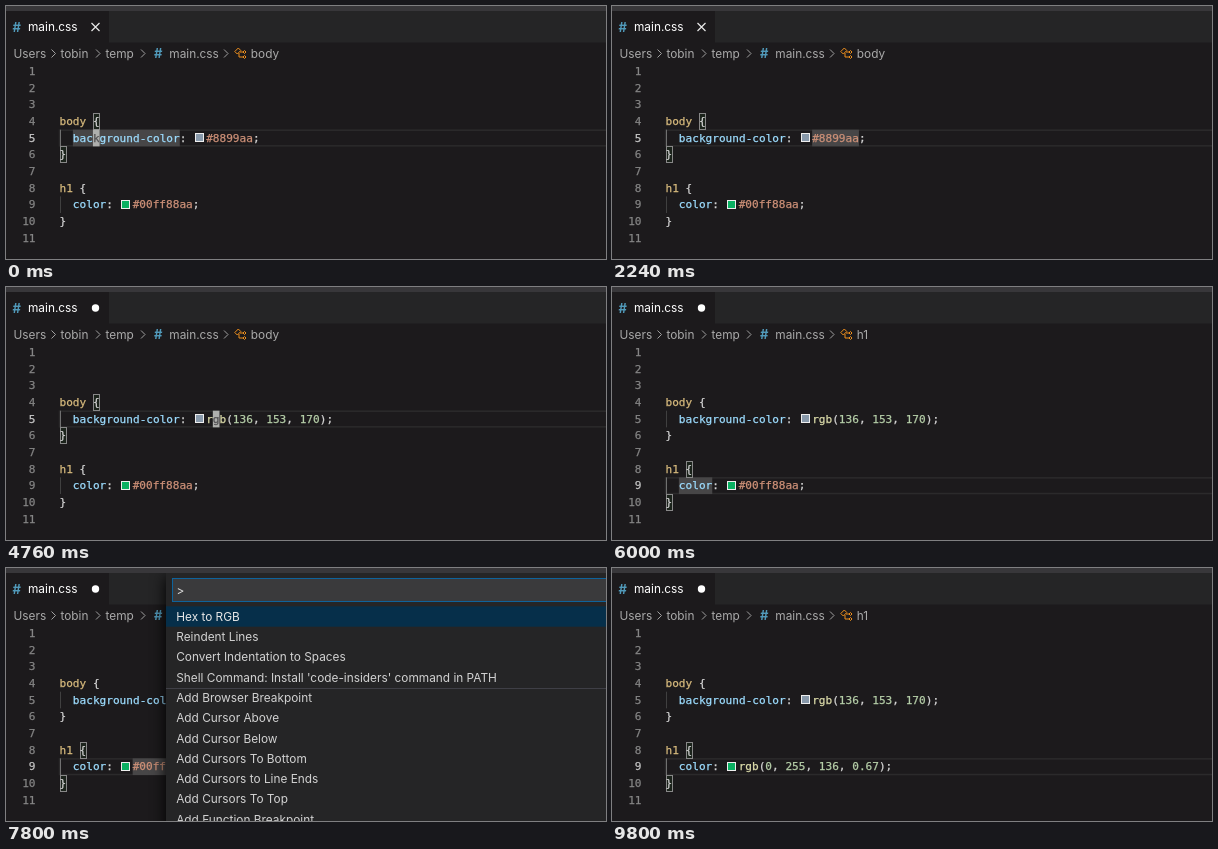
Animation, 600 px wide and 253 px high, one loop 9.84 s. Source, as an HTML page:

```html
<!DOCTYPE html>
<html lang="en">
<head>
<meta charset="utf-8">
<title>Hex to RGB</title>
<style>
  html, body { margin: 0; width: 100%; height: 100%; overflow: hidden; background: #1c1a1c; }
  svg { display: block; width: 600px; height: 253px; }
  text { white-space: pre; font: 11.85px Inter, sans-serif; }
  .code { font: 11.1px "DejaVu Sans Mono", monospace; stroke-width: .25px; }
  .icon { font-weight: 700; font-size: 13px; }
</style>
</head>
<body>
<svg id="stage" viewBox="0 0 600 253"></svg>
<script>
const LOOP = 9840, CHAR = 6.682, ROW = 16.67, LEFT = 53.5, SWATCH = 13;
const GREY = '#d4d4d4', GOLD = '#d7ba7d', BLUE = '#9cdcfe', ORANGE = '#ce9178', GREEN = '#b5cea8', YELLOW = '#dcdcaa';
const stage = document.getElementById('stage');

const colX = (col, afterSwatch) => LEFT + col * CHAR + (afterSwatch ? SWATCH : 0);
const rowY = line => 57 + ROW * (line - 1);
const snap = v => Math.round(v) + 0.5;
const rect = (x, y, w, h, fill, extra = '') =>
  `<rect x="${x}" y="${y}" width="${w}" height="${h}" fill="${fill}" ${extra}/>`;
const text = (x, y, s, fill, extra = '') => `<text x="${x}" y="${y}" fill="${fill}" ${extra}>${s}</text>`;
const stroke = (d, color, width = 1) => `<path d="${d}" fill="none" stroke="${color}" stroke-width="${width}"/>`;
const code = (x, line, tokens, extra = '') => text(x, rowY(line) + 12, tokens.map(
  ([color, s]) => `<tspan fill="${color}" stroke="${color}">${s}</tspan>`).join(''), GREY, `class="code" ${extra}`);

const hex = value => [[ORANGE, value], [GREY, ';']];
const rgb = (...values) => [[YELLOW, 'rgb'], [GREY, '('],
  ...values.flatMap((v, i) => i ? [[GREY, ', '], [GREEN, v]] : [[GREEN, v]]), [GREY, ');']];

// Cursor stops: start time, line, column, covered letter, highlighted word
const stops = [
  { at: 0, line: 5, col: 5, char: 'k', word: [2, 16], ready: true },
  { at: 1500, line: 5, col: 21, char: '8', word: [20, 7], value: true },
  { at: 3700, line: 5, col: 21, char: 'g', value: true },
  { at: 5350, line: 9, col: 4, char: 'l', word: [2, 5] },
  { at: 6700, line: 9, col: 10, char: '0', word: [9, 9], value: true },
  { at: 8000, line: 9, col: 10, char: 'g', value: true }
];
const palettes = [[2700, 3700], [7250, 8000]];
const paletteOpen = t => palettes.some(([from, to]) => t >= from && t < to);
const commands = ['Hex to RGB', 'Reindent Lines', 'Convert Indentation to Spaces',
  "Shell Command: Install 'code-insiders' command in PATH", 'Add Browser Breakpoint', 'Add Cursor Above',
  'Add Cursor Below', 'Add Cursors To Bottom', 'Add Cursors to Line Ends', 'Add Cursors To Top',
  'Add Function Breakpoint'];

function header(dirty, symbol) {
  const crumbs = [[7.5, 'Users'], [54.5, 'tobin'], [99.5, 'temp'], [163.3, 'main.css'], [244.8, symbol]];
  return rect(0, 0, 600, 5, '#38373a') + rect(0, 5, 600, 31.5, '#252526') + rect(0, 5, 103, 32, '#1c1a1c') +
    text(6.5, 25.5, '#', '#519aba', 'class="icon"') + text(22, 25, 'main.css', '#fff') +
    (dirty ? '<circle cx="89.5" cy="21" r="3.7" fill="#fff"/>'
           : stroke('M85.5 17l8 8m0-8l-8 8', '#e8e8e8', 1.2)) +
    crumbs.map(([x, s]) => text(x, 52, s, '#a9a9a9')).join('') +
    [45.5, 90, 135, 218].map(x => stroke(`M${x} 43.5l4 4-4 4`, '#a0a0a0')).join('') +
    text(148, 52.3, '#', '#519aba', 'class="icon"') +
    stroke('M228.8 45.5l3.5-3.5 2.5 2.5-3.5 3.5zM234 46h3M233 47v4h4' +
      'M237 46l1.5-1.5 1.5 1.5-1.5 1.5zM237 51l1.5-1.5 1.5 1.5-1.5 1.5z', '#ee8f1c');
}

function editor(stop, t) {
  const { line, col, char, word, value } = stop, y = rowY(line);
  const braces = line === 5 ? [[4, 5], [6, 0]] : [[8, 3], [10, 0]];
  const visible = !paletteOpen(t) && (t - stop.at) % 1000 < 500;
  let out = rect(LEFT, y + 0.5, 560, ROW - 1, 'none', 'stroke="#2b2a2b" stroke-width="1.5"');
  for (const n of [5, 9])
    out += rect(54, rowY(n), 1, ROW, n === line ? '#707070' : '#404040');
  if (word && (stop.ready || t - stop.at >= 250))
    out += rect(colX(word[0], value), y, word[1] * CHAR, ROW, '#474647');
  for (const [n, c] of braces)
    out += rect(snap(colX(c)), snap(rowY(n)), 6, 16, '#1b231b', 'stroke="#888"');
  for (let n = 1; n <= 11; n++)
    out += code(29.5, n, [[n === line ? '#c6c6c6' : '#858585', n]], 'text-anchor="end"');

  out += code(LEFT, 4, [[GOLD, 'body'], [GREY, ' {']]) + code(LEFT, 6, [[GREY, '}']]) +
    code(LEFT, 8, [[GOLD, 'h1'], [GREY, ' {']]) + code(LEFT, 10, [[GREY, '}']]);
  const rules = [
    [5, 'background-color', '#8899aa', t < 3700 ? hex('#8899aa') : rgb(136, 153, 170)],
    [9, 'color', '#0ab062', t < 8000 ? hex('#00ff88aa') : rgb(0, 255, 136, 0.67)]
  ];
  for (const [n, name, color, tokens] of rules) {
    const end = name.length + 4;
    out += code(colX(2), n, [[BLUE, name], [GREY, ':']]) +
      rect(snap(colX(end) + 1.8), snap(rowY(n) + 3.5), 8, 8, color, 'stroke="#eee"') +
      code(colX(end, true), n, tokens);
  }
  if (visible)
    out += rect(colX(col, value), y, CHAR, ROW, '#aeafad') + code(colX(col, value), line, [['#515052', char]]);
  return out;
}

function palette() {
  return rect(160, 5, 450, 260, '#252526', 'style="filter:drop-shadow(0 4.6px 7.4px #000)"') +
    rect(0, 0, 600, 5, '#38373a') +
    rect(166.5, 10.5, 450, 23, '#3a3a3c', 'stroke="#0e639c"') + text(170.5, 27, '&gt;', '#ddd') +
    rect(160, 38.3, 440, 20.4, '#062f4a') + rect(160, 120, 440, 1, '#3f3f46') +
    commands.map((s, i) => text(170.2, 52.7 + i * 20.3, s, i ? '#d2d2d2' : '#e6e6e6')).join('');
}

let shown = '';
function draw(now) {
  const t = now % LOOP;
  const stop = stops.findLast(s => s.at <= t);
  const picture = rect(0, 0, 600, 253, '#1c1a1c') + header(t >= 3700, stop.line === 5 ? 'body' : 'h1') +
    editor(stop, t) + (paletteOpen(t) ? palette() : '');
  if (picture !== shown) stage.innerHTML = shown = picture;
  requestAnimationFrame(() => draw(performance.now()));
}
draw(0);
</script>
</body>
</html>
```
